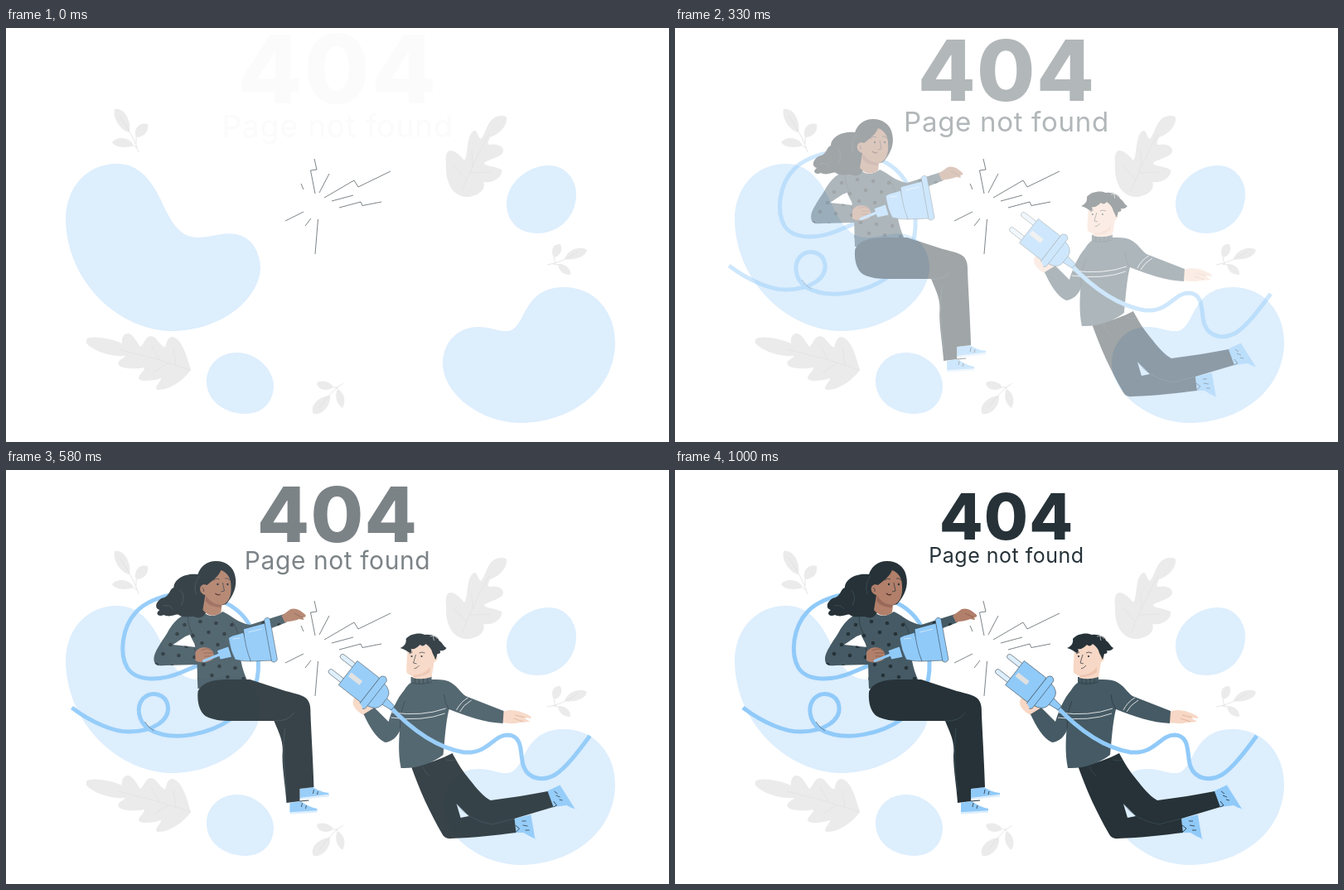
Recreate the animation shown at these times as an HTML page with a canvas. Size 800 by 500 pixels, loop 1.04 s.

```html
<!DOCTYPE html>
<html lang="en">
<head>
<meta charset="utf-8">
<title>404</title>
<style>
html, body { margin: 0; width: 100%; height: 100%; overflow: hidden; background: #fff; }
canvas { display: block; width: 800px; height: 500px; }
</style>
</head>
<body>
<canvas id="stage" width="800" height="500"></canvas>
<script>
const W = 800, H = 500, LOOP = 1040, FPS = 24;
const INK = '#263238', KNIT = '#455a64', BLUE = '#90caf9', PALE = '#ddeefd';
const TAN = '#b17f6a', PEACH = '#f7d7c5', LEAF = '#ebebeb', VEIN = '#e0e0e0';

const screen = document.getElementById('stage').getContext('2d');
const layer = newLayer(), backdrop = newLayer();
let g = screen;

function newLayer() {
  const c = document.createElement('canvas');
  c.width = W;
  c.height = H;
  return c.getContext('2d');
}

function fill(d, color) {
  g.fillStyle = color;
  g.fill(new Path2D(d), 'evenodd');
}

function line(d, color, width = 0.8) {
  g.strokeStyle = color;
  g.lineWidth = width;
  g.stroke(new Path2D(d));
}

function part(d, color, edge = INK, width = 0.5) {
  fill(d, color);
  line(d, edge, width);
}

function dot(x, y, r, color) {
  g.fillStyle = color;
  g.beginPath();
  g.arc(x, y, r, 0, 7);
  g.fill();
}

function drawBackdrop() {
  g.fillStyle = '#fff';
  g.fillRect(0, 0, W, H);

  fill('M133,164C160,163 176,185 186,206C198,232 208,252 230,253C248,253 262,246 278,249C297,253 307,271 307,291C305,325 265,363 205,366C140,368 74,310 72,232C72,190 100,164 133,164Z', PALE);
  fill('M655,166C674,166 688,182 688,201C688,230 665,248 641,248C618,248 604,233 604,212C604,188 629,166 655,166Z', PALE);
  fill('M673,313C712,313 736,345 735,382C733,440 680,477 620,477C570,476 527,440 527,405C527,380 545,361 570,361C585,361 594,367 606,366C628,363 622,313 673,313Z', PALE);
  fill('M278,392C300,391 323,411 323,432C323,452 309,466 289,466C264,466 242,450 242,427C242,407 258,392 278,392Z', PALE);

  // sprigs
  fill('M131,98C142,95 152,112 149,126C140,125 128,110 131,98ZM171,116C161,113 153,122 157,132C166,132 173,125 171,116ZM128,138C134,130 150,132 154,142C146,145 132,145 128,138Z', LEAF);
  line('M137,106Q155,132 160,150M157,132L157,140M154,142L158,145', VEIN);
  fill('M701,268C693,262 677,268 674,279C685,281 699,277 701,268ZM669,261C659,260 657,270 661,277C669,276 672,268 669,261ZM666,285C674,284 682,290 681,298C673,298 667,294 666,285Z', LEAF);
  line('M653,286Q672,283 690,270M661,277L663,285M660,285L666,286', VEIN);
  fill('M375,429C379,424 392,427 395,434C388,439 377,438 375,429ZM400,436C408,440 411,450 406,459C399,454 396,445 400,436ZM391,444C392,456 382,468 371,466C366,456 377,445 391,444Z', LEAF);
  line('M407,429Q393,437 378,459M395,434L400,434M400,436L399,434', VEIN);

  // oak leaves
  fill('M604,108C605,118 596,128 584,132C582,137 580,141 584,141C591,139 600,142 600,148C600,156 582,158 577,163C577,167 588,166 598,171C600,178 590,188 576,186C580,196 568,204 555,204C538,203 530,185 531,165C530,155 531,149 536,148C542,148 548,154 553,160C558,155 555,128 565,124C569,123 569,132 573,134C580,128 580,106 598,106Q603,106 604,108Z', LEAF);
  line('M583,128Q567,155 550,197M563,168L562,148M560,175L585,174M556,184L540,166', VEIN, 0.6);
  fill('M97,376C103,371 124,374 140,381C139,374 142,368 148,369C154,371 157,378 162,385C167,382 167,374 174,372C182,372 183,381 192,386C194,380 194,374 201,373C212,376 217,392 223,413C216,423 200,437 183,437C177,435 188,426 187,423C178,426 162,428 160,423C160,418 168,414 167,410C158,412 140,412 136,407C133,402 142,399 144,396C128,397 108,392 97,381Z', LEAF);
  line('M135,388Q180,398 223,413M185,401L175,383M195,405L178,416M205,408L202,386', VEIN, 0.6);

  // sparks
  line('M372,158L375,171L367.5,172L373,200M390,176L378,199M356,188L359,195M384,205L420,184L425,192L464,173M393,209L419,202M402,217L428,210L430,214.5L453,210M359,222L337,233M368,230L361,239M376.5,231L373,273', INK, 0.6);
}

function shoe(body, sole, laces) {
  fill(body, BLUE);
  line(sole, PALE, 2.4);
  line(laces, INK, 0.8);
}

const ARM = 'M226,173C212,174 203,186 197,197C190,208 181,220 181,228C181,236 186,237 194,236L234,235L232,214L204,211L219,201L229,197Z';
const TOP = 'M222,175C232,172 237,170 240,171Q250,181 264,171C275,176 283,185 297,187L338,174L341,184L300,200L284,206C284,225 287,240 294,255Q262,264 234,264C233,245 234,225 230,210C222,195 218,185 222,175Z';

function drawWoman() {
  line('M82,287C107,306 135,317 152,316C180,316 200,302 198,286C196,270 178,266 168,276C159,286 162,304 175,313C205,330 250,318 275,300C300,280 308,255 307,232C306,200 296,172 262,158C230,140 180,150 160,171C142,190 139,222 149,239C160,256 190,255 215,244Q240,234 262,222', BLUE, 5);
  line('M170,304Q174,311 181,315', KNIT, 0.7);

  shoe('M357,385L373,383Q382,389 392,390L392,394L357,397Z', 'M358,397L392,393', 'M374,386L373,391M379,388L378,392');
  shoe('M345,402L358,400Q368,407 378,409L378,412L345,414Z', 'M345,414.5L378,412.5', 'M360,402L359,407M365,405L364,409');
  line('M357,400L368,399', INK, 1.2);

  fill(ARM, KNIT);
  fill(TOP, KNIT);
  g.save();
  const knit = new Path2D(TOP);
  knit.addPath(new Path2D(ARM));
  g.clip(knit);
  for (let row = 0; row < 7; row++) {
    for (let col = 0; col < 10; col++) {
      dot(180 + col * 19 + (row % 2) * 9 + row, 183 + row * 13 + (col % 3) * 2, 2.3, INK);
    }
  }
  g.restore();
  line('M222,177Q222,190 230,202M230,214L233,230M276,183Q282,192 284,205', INK, 0.6);

  fill('M234,268C238,257 252,253 270,253L297,253L340,267C352,270 362,272 366,277C370,282 370,288 370,295C371,320 373,350 374,383L357,385L357,400L341,402C340,385 336,362 336,345C338,328 332,318 326,303L275,303C262,303 252,302 243,297C236,292 233,280 234,268Z', INK);
  line('M326,303Q343,304 350,293M339,312Q335,345 341,388', KNIT, 0.6);

  // hair, face
  fill('M256,110C244,110 237,117 234,126C220,124 205,131 205,142C199,144 201,153 190,155C182,160 182,168 188,169C182,173 186,178 193,175C201,179 208,173 211,175C218,180 226,175 232,178C239,180 243,175 246,168L268,162C277,152 282,140 279,128C277,117 268,110 256,110Z', INK);
  line('M236,128Q228,138 232,150M212,145Q220,150 214,164M192,164Q200,162 204,168', KNIT, 0.6);
  fill('M262,121C258,130 251,134 245,139C236,135 233,148 243,151L240,169Q250,181 262,172L263,163C271,161 275,152 274,140C274,131 270,124 262,121Z', TAN);
  fill('M244,152Q250,162 262,163L262,166Q249,166 243,158Z', '#98695a');
  line('M253,133Q256,130 260,132M267,131Q270,130 273,133M264,136L266,146L262,147M239,142Q242,143 241,147', INK, 0.7);
  dot(258, 138, 1.2, INK);
  dot(270, 138, 1.2, INK);
  line('M255,149Q258,152 261,150', '#4f2f28', 1.2);

  fill('M335,176L346,168C352,166 358,169 364,175Q365,178 361,178L362,181L356,180C350,183 345,182 339,184Z', TAN);
  line('M350,173L360,178', '#7d5244', 0.6);

  // socket
  part('M257,218L271,213L275,226L261,229Z', BLUE);
  part('M271,203C275,199 283,199 289,196L298,231C290,231 284,230 279,229Q273,218 271,203Z', BLUE);
  part('M289,192L315,185L324,230L298,231Q291,214 289,192Z', BLUE);
  part('M314,181Q317,176 321,180L330,229Q327,234 323,231Z', BLUE);
  line('M276,204L285,203M295,196L311,192', PALE, 0.8);

  fill('M231,220C235,213 246,213 250,217C254,221 255,227 250,230C243,233 236,233 231,230Z', TAN);
  line('M241,221L252,221M242,225L252,225M238,218Q246,214 250,218', '#7d5244', 0.7);
  line('M240,231L260,223', BLUE, 3);
}

function drawPlug() {
  g.save();
  g.translate(410, 245);
  g.rotate(0.663);
  part('M1,-14.5H-17A3,3 0 0 0 -17,-8.5H1ZM1,8.5H-17A3,3 0 0 0 -17,14.5H1Z', PALE);
  part('M54,-5L69,-3V3L54,5Z', BLUE);
  part('M42,-17Q55,-15 56,-6V6Q55,15 42,17Z', BLUE);
  part('M0,-18.5H34V18.5H0Z', BLUE);
  part('M34,-21Q38.5,-27 43,-21V21Q38.5,27 34,21Z', BLUE);
  fill('M3,-3H20V3H3Z', VEIN);
  g.restore();
}

function drawMan() {
  shoe('M650,388L667,380L687,410Q680,409 674,405L658,407Z', 'M667,380L686,410', 'M659,388L663,391M661,393L666,395M665,398L669,399');
  shoe('M611,421L632,416L637,446Q628,442 622,438L613,438Z', 'M632,416L637,445', 'M620,424L625,424M621,429L627,430M624,435L629,435');
  line('M658,400L662,405L658,407M612,429L617,433L613,437', INK, 0.9);
  fill('M486,357C505,356 525,348 536,342C542,353 546,360 553,369C562,380 570,392 582,399C606,396 630,392 651,388L658,407L611,421L613,438C590,441 562,444 535,445Q527,446 524,440C508,412 497,388 486,357ZM541,403L556,418L546,420Z', INK);
  line('M541,403Q555,423 584,428L611,421M500,358Q503,366 508,369M528,350Q535,352 540,350', KNIT, 0.5);

  // hands and knit
  fill('M418,275C413,282 418,290 429,296L442,288C438,284 432,281 428,277Z', PEACH);
  fill('M597,292C606,288 616,290 628,296Q632,298 631,300L622,299L630,304L617,305C610,307 604,306 597,305Z', PEACH);
  line('M612,296L624,299M610,300L622,304', '#cf9c84', 0.6);
  fill('M484,260C472,270 464,287 459,304L442,287L429,295C436,310 444,324 455,329C464,328 470,322 474,312Z', KNIT);
  fill('M486,250L511,249L511,253C518,253 525,253 531,255C542,260 545,268 552,273L598,291L597,306C575,305 555,298 532,289C528,305 527,325 525,344C512,354 493,361 474,360C470,340 472,322 473,306C471,280 477,262 486,257Z', KNIT);
  line('M473,312Q473,292 479,279M532,289Q526,280 526,271M487,257Q498,260 511,256M491,251V257M496,251V258M501,251V258M506,250V257', INK, 0.6);
  line('M463,293Q500,298 528,288M462,299Q500,304 527,294M541,290Q546,280 555,275M545,292Q549,284 559,278', '#fff', 0.8);

  // head
  fill('M482,211C482,225 480,238 481,245Q487,249 488,249L488,251Q499,254 511,250L514,232C520,230 519,221 514,221L510,209Z', PEACH);
  fill('M489,248Q503,247 509,238L509,244Q501,250 489,250Z', '#edc4b0');
  fill('M473,215C478,213 481,209 480,204C485,197 498,196 503,199C511,198 519,201 520,206C524,208 525,213 529,215Q526,219 521,218Q523,222 518,222L516,229L512,221C511,216 508,213 504,210C502,213 499,213 497,211C493,215 490,217 486,216Q488,220 485,221C481,219 480,217 473,215Z', INK);
  line('M509,201Q515,199 518,204M514,198Q512,202 514,206', '#f5f5f5', 0.6);
  line('M484,222L488,220M496,221Q499,219 503,221M492,223L489,233L493,234M490,240Q494,239 496,236M515,224Q517,225 515,228', INK, 0.7);
  dot(487, 225, 1.1, INK);
  dot(499, 225, 1.1, INK);

  line('M459,284C485,312 515,335 550,341C580,343 585,320 603,320C623,321 617,345 622,358C628,374 646,376 660,368C673,360 688,340 702,321', BLUE, 5);
  drawPlug();
  fill('M417,278Q422,279 426,284Q429,288 426,290Q418,288 417,278Z', PEACH);
}

function drawTitle(p) {
  const s = 1.5 - p / 2;
  g.save();
  g.globalAlpha = p;
  g.translate(400, 70.5);
  g.scale(s, s);
  g.fillStyle = INK;
  g.textAlign = 'center';
  g.font = '800 77px Montserrat, Inter, sans-serif';
  g.letterSpacing = '1px';
  g.fillText('404', 0, 13.5);
  g.font = '400 25px Montserrat, Inter, sans-serif';
  g.letterSpacing = '0.5px';
  g.fillText('Page not found', 0, 41.5);
  g.restore();
}

// cubic-bezier(.36, -.01, .5, 1.38)
function ease(x) {
  const at = (s, a, b) => 3 * (1 - s) ** 2 * s * a + 3 * (1 - s) * s * s * b + s ** 3;
  let lo = 0, hi = 1;
  for (let i = 0; i < 24; i++) {
    const mid = (lo + hi) / 2;
    if (at(mid, 0.36, 0.5) < x) lo = mid; else hi = mid;
  }
  return at(lo, -0.01, 1.38);
}

function slideIn(draw, from, e) {
  g = layer;
  g.setTransform(1, 0, 0, 1, 0, 0);
  g.clearRect(0, 0, W, H);
  g.translate(from * (1 - e), 0);
  draw();
  g = screen;
  g.globalAlpha = Math.min(1, Math.max(0, e));
  g.drawImage(layer.canvas, 0, 0);
  g.globalAlpha = 1;
}

function render(now) {
  const t = now % LOOP;
  const step = t < 80 ? 0 : Math.floor(t * FPS / 1000 + 0.09);
  const p = Math.min(1, (step + 0.5) / FPS);
  const e = ease(p);
  g = screen;
  g.drawImage(backdrop.canvas, 0, 0);
  slideIn(drawWoman, -30, e);
  slideIn(drawMan, 30, e);
  drawTitle(p);
}

g = backdrop;
drawBackdrop();

let start;
function tick(now) {
  start ??= now;
  render(now - start);
  requestAnimationFrame(tick);
}
render(0);
requestAnimationFrame(tick);
</script>
</body>
</html>
```
